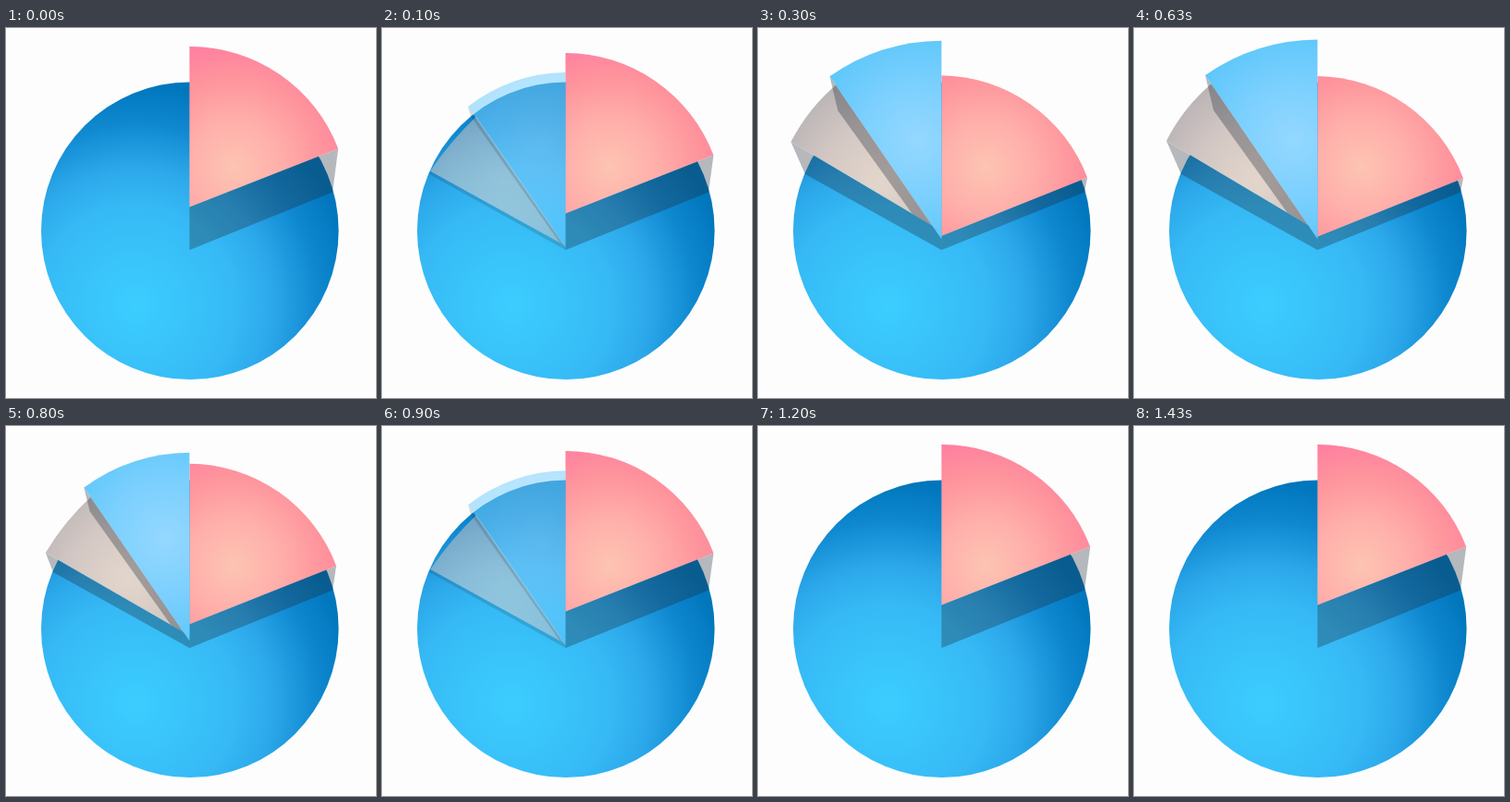
Animation of 400 by 400 pixels, one loop 1.46 s. Source, as an HTML page with a canvas:

```html
<!DOCTYPE html>
<html>
<head>
<meta charset="utf-8">
<title>Pie chart</title>
<style>
html, body { margin: 0; width: 100%; height: 100%; overflow: hidden; background: #fdfdfd; }
canvas { display: block; width: 400px; height: 400px; }
</style>
</head>
<body>
<canvas id="stage" width="400" height="400"></canvas>
<script>
const ctx = document.getElementById('stage').getContext('2d');
const LOOP = 1460, MOVE = 333, OUT_END = 1000;
const CX = 198.4, BASE_Y = 240;
const SHADE = 'rgba(30,40,50,.32)';

function radial(x, y, r, ...stops) {
  const gradient = ctx.createRadialGradient(x, y, 0, x, y, r);
  stops.forEach(([at, color]) => gradient.addColorStop(at, color));
  return gradient;
}
const mix = (a, b, p) => a + (b - a) * p;
const mixPoint = (a, b, p) => a.map((v, i) => mix(v, b[i], p));

const pie = new Path2D();
pie.arc(198.8, 219.2, 160.8, 0, Math.PI * 2);

const pieFill = radial(140, 300, 240,
  [0, '#3cceff'], [.45, '#36b9f5'], [.62, '#2ca8ea'], [.82, '#0f88d0'], [1, '#0076bc']);
const redFill = radial(246, 151, 150,
  [0, '#fdc4b2'], [.35, '#ffaeaa'], [.65, '#fe949c'], [1, '#ff78a2']);
const greyFill = radial(132, 165, 120,
  [0, '#e2d6cc'], [.5, '#d4c8c4'], [1, '#b6b2b4']);
const blueFill = radial(172, 122, 150,
  [0, '#94d8ff'], [.4, '#7cd0fe'], [1, '#4cc2f8']);

const wedge = (tipY, from, to, r) =>
  new Path2D(`M${CX} ${tipY}L${from}A${r} ${r} 0 0 1 ${to}Z`);
const polygon = (...points) => new Path2D('M' + points.join('L') + 'Z');

function fill(path, style, opacity = 1, clip) {
  ctx.save();
  if (clip) ctx.clip(clip);
  ctx.globalAlpha = opacity;
  ctx.fillStyle = style;
  ctx.fill(path);
  ctx.restore();
}

function draw(p) {
  ctx.fillStyle = '#fdfdfd';
  ctx.fillRect(0, 0, 400, 400);
  fill(pie, pieFill);

  const opacity = Math.min(1, p * 2.5);
  const greyTip = BASE_Y - 21 * p;
  const greyEnd = mixPoint([57, 164], [35, 122], p);
  const grey = wedge(greyTip, greyEnd, mixPoint([107, 106], [84, 60], p), 400 - 200 * p);
  fill(polygon(greyEnd, [51, 158], [CX, BASE_Y], [CX, greyTip]), SHADE, opacity);

  const lift = mix(46.4, 14.5, p);
  const redTip = BASE_Y - lift;
  const redEnd = [354.5 + lift / 10, 177 - lift];
  fill(polygon([CX, redTip], redEnd, [353, 177.5], [CX, BASE_Y]), SHADE);
  fill(wedge(redTip, [CX, 66.5 - lift], redEnd, 171), redFill);

  const blueTip = BASE_Y - 12 * p;
  const blueEnd = mixPoint([97.5, 94.5], [77, 51], p);
  const edge = polygon(blueEnd, mixPoint([99, 98], [86, 89], p), [CX, BASE_Y + 5 * p], [CX, blueTip]);
  const aboveGreyRim = polygon([0, 0], greyEnd, [CX, greyTip], [CX, 0]);
  fill(grey, greyFill, opacity);
  fill(edge, SHADE, opacity, aboveGreyRim);
  fill(wedge(blueTip, blueEnd, [CX, 58 - 45.5 * p], 160.5 + 54.5 * p), blueFill, opacity);
}

function tick(now) {
  const t = now % LOOP;
  const u = Math.max(0, Math.min(1, t / MOVE, (OUT_END - t) / MOVE));
  draw(u * u * (3 - 2 * u));
  requestAnimationFrame(tick);
}
draw(0);
requestAnimationFrame(tick);
</script>
</body>
</html>
```
